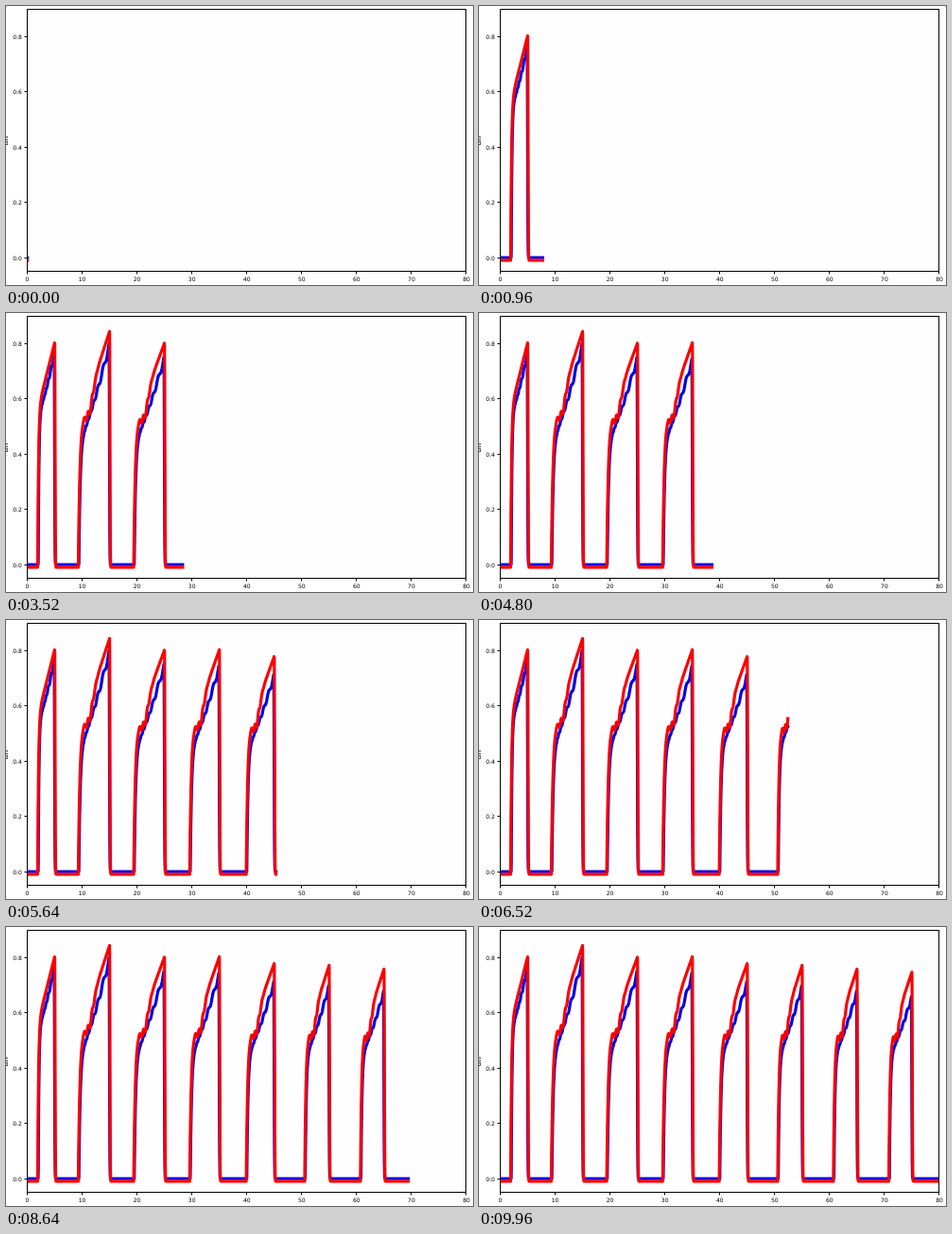
Animation of 494 by 295 pixels, one loop 10 s. Source, as an HTML page:

```html
<!DOCTYPE html>
<html lang="en">
<head>
<meta charset="utf-8">
<title>Signal plot</title>
<style>
  html, body { margin: 0; width: 100%; height: 100%; overflow: hidden; background: #fff; }
  svg { display: block; width: 494px; height: 295px; font: 6px "DejaVu Sans", sans-serif; }
  .line { fill: none; stroke-width: 3.2; stroke-linecap: square; stroke-linejoin: round; }
  .axis { fill: none; stroke: #000; stroke-width: 1; }
</style>
</head>
<body>
<svg viewBox="0 0 494 295">
  <clipPath id="area"><rect x="22.5" y="3.5" width="464" height="277"/></clipPath>
  <rect x="22.5" y="3.5" width="464" height="277" fill="#fefdff"/>
  <g clip-path="url(#area)">
    <polyline id="blue" class="line" stroke="#0000e8"/>
    <polyline id="red" class="line" stroke="#fa0000"/>
  </g>
  <rect class="axis" x="22.5" y="3.5" width="464" height="277"/>
  <path id="ticks" class="axis"/>
  <g id="labels"></g>
  <text transform="translate(1.6 147.4) rotate(-90)" font-size="8">an</text>
</svg>
<script>
const $ = id => document.getElementById(id);
const px = x => 22.5 + x * 5.806;
const py = y => 266 - y * 291.8;

function label(text, x, y, anchor) {
  const el = document.createElementNS("http://www.w3.org/2000/svg", "text");
  el.textContent = text;
  el.setAttribute("x", x);
  el.setAttribute("y", y);
  el.setAttribute("text-anchor", anchor);
  $("labels").append(el);
}

let ticks = "";
for (let i = 0; i <= 80; i += 10) {
  ticks += `M${Math.floor(px(i)) + .5} 280.5v3`;
  label(i, px(i), 291.2, "middle");
}
for (let i = 0; i < 5; i++) {
  const y = Math.floor(py(i / 5)) + .5;
  ticks += `M22.5 ${y}h-3`;
  label((i / 5).toFixed(1), 16.8, y + 2.1, "end");
}
$("ticks").setAttribute("d", ticks);

// One pulse every 10 units, ending at 5, 15, 25...
const starts = [1.9, 9.3, 19.4, 29.6, 39.9, 50.55, 60.7, 70.8];
const peaks = [.805, .845, .803, .804, .78, .773, .76, .748];

const attack = (u, tau) => 1 - Math.exp(-u / tau);
const bell = x => Math.exp(-x * x);

// Slope with a rippled dip; the first pulse has none
function redRise(u, i) {
  const base = i ? .5 : .56;
  const ripple = 1 - .2 * Math.sin(50 * (u - .035));
  const dip = i ? .07 * bell((u - .35) / .17) * ripple : 0;
  return base * attack(u, .05) + (peaks[i] - base) * u - dip;
}

// Slope with stairs that widen towards the peak
function blueRise(u, i) {
  const base = i ? .45 : .55;
  const peak = peaks[i] - .045 - .007 * i;
  const stairs = 1 + .04 * Math.sin(8 * Math.PI * Math.log((u + 1e-6) / .97));
  return base * attack(u, .045) + (peak - base) * u ** 1.3 * stairs;
}

// Signal at t: rest, rise, then a steep fall
function signal(t, { rise, rest, delay, lead, fall }) {
  const i = Math.min(7, Math.floor((t + 1) / 10));
  const start = starts[i] + delay, end = i * 10 + 5 - lead;
  if (t < start) return rest;
  if (t < end) return rise((t - start) / (end - start), i);
  return Math.max(rest, rest + (rise(1, i) - rest) * bell((t - end) / fall));
}

const STEPS = 249, PER_STEP = 12;
function sample(options) {
  return Array.from({ length: STEPS * PER_STEP + 2 }, (_, k) => {
    const t = k * 80 / (STEPS * PER_STEP);
    return px(t).toFixed(2) + "," + py(signal(t, options)).toFixed(2);
  });
}
const curves = {
  red: sample({ rise: redRise, rest: -.01, delay: 0, lead: 0, fall: .09 }),
  blue: sample({ rise: blueRise, rest: 0, delay: .1, lead: .1, fall: .1 })
};

const begin = performance.now();
let last = -1;
function draw(now) {
  const step = Math.floor(Math.max(0, now - begin) % 10000 / 40);
  if (step !== last) {
    last = step;
    for (const id in curves)
      $(id).setAttribute("points", curves[id].slice(0, step * PER_STEP + 2).join(" "));
  }
  requestAnimationFrame(draw);
}
draw(begin);
</script>
</body>
</html>
```
